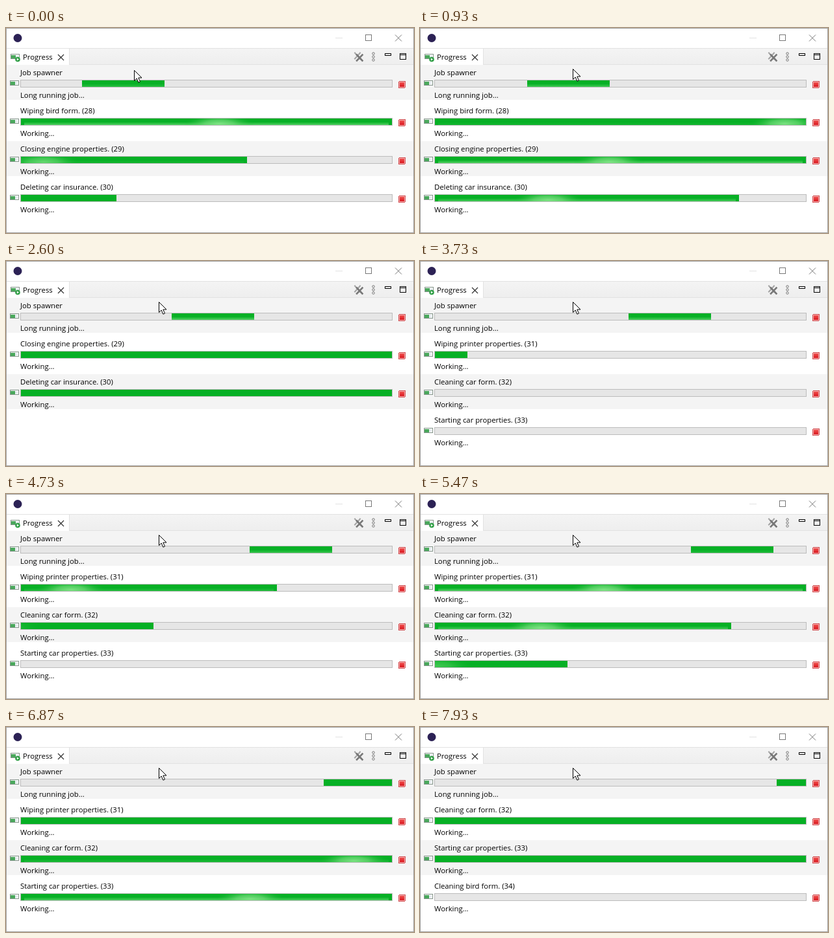
Animation, 628 px wide and 317 px high, one loop 8000 ms. Source, as an HTML page:

```html
<!DOCTYPE html>
<html lang="en">
<head>
<meta charset="utf-8">
<title>Progress</title>
<style>
  html, body { margin: 0; width: 100%; height: 100%; overflow: hidden; background: #fff; }
  svg { display: block; }
  text { font: 11.3px "Open Sans", "Noto Sans", sans-serif; fill: #000; }
  rect, .crisp { shape-rendering: crispEdges; }
  .line { fill: none; }
</style>
</head>
<body>
<svg id="stage" width="628" height="317" viewBox="0 0 628 317">
  <defs>
    <radialGradient id="shine" cx=".5" cy=".5" r=".5">
      <stop offset="0" stop-color="#86e68a" stop-opacity=".9"/>
      <stop offset=".4" stop-color="#78de7e" stop-opacity=".65"/>
      <stop offset=".75" stop-color="#50cc5c" stop-opacity=".2"/>
      <stop offset="1" stop-color="#06b025" stop-opacity="0"/>
    </radialGradient>
    <linearGradient id="glow" x2="0" y2="1">
      <stop offset="0" stop-color="#5fd56c" stop-opacity="0"/>
      <stop offset=".5" stop-color="#66d872" stop-opacity=".4"/>
      <stop offset="1" stop-color="#6cdb78" stop-opacity=".8"/>
    </linearGradient>
    <linearGradient id="tabs" x2="0" y2="1">
      <stop offset="0" stop-color="#f4f4f4"/>
      <stop offset="1" stop-color="#eee"/>
    </linearGradient>
    <linearGradient id="red" x2="0" y2="1">
      <stop offset="0" stop-color="#f0504e"/>
      <stop offset="1" stop-color="#d8141c"/>
    </linearGradient>
    <g id="jobIcon">
      <rect x=".5" y=".5" width="13" height="7" fill="#fafcfa" stroke="#84948b"/>
      <rect x="1" y="2" width="7" height="5" fill="#4aa85c"/>
      <rect x="8" y="2" width="4" height="4" fill="#e6ecf0"/>
    </g>
    <g id="stop">
      <rect x=".5" y=".5" width="10" height="10" rx="1.500" fill="#f7b4b4" stroke="#cf4a4e"/>
      <rect x="2" y="2" width="7" height="7" fill="url(#red)"/>
    </g>
  </defs>

  <rect width="628" height="317" fill="#fff"/>
  <circle cx="18" cy="15.500" r="6.500" fill="#2c2255"/>
  <g class="line">
    <path class="crisp" d="M507 15.500h11" stroke="#e2e2e2"/>
    <rect x="553.500" y="10.500" width="9" height="9" stroke="#777"/>
    <path d="M599 10.500l10 10m0-10l-10 10" stroke="#777"/>
  </g>

  <rect x="1" y="31" width="626" height="26" fill="url(#tabs)"/>
  <rect x="1" y="32" width="96" height="25" fill="#fff"/>
  <path class="line crisp" d="M1 31.500H627M97.500 32V56.500H627" stroke="#e2e2e2"/>
  <use href="#jobIcon" x="7" y="40"/>
  <circle cx="18" cy="48.500" r="3.800" fill="#2f9e45"/>
  <path d="M16.800 46.500v4l3.200-2z" fill="#fff"/>
  <text x="26" y="49">Progress</text>
  <path class="line" d="M80 41l9 9m0-9l-9 9" stroke="#333" stroke-width="1.200"/>
  <g class="line" stroke-linecap="square">
    <path d="M537 38.500l8 9m0-9l-8 9" stroke="#a4a4a4" stroke-width="2"/>
    <path d="M540 41.500l8.500 9m0-9l-8.500 9" stroke="#777" stroke-width="2.600"/>
  </g>
  <g fill="#fff" stroke="#666">
    <circle cx="565.500" cy="39.500" r="1.700"/>
    <circle cx="565.500" cy="44.500" r="1.700"/>
    <circle cx="565.500" cy="49.500" r="1.700"/>
  </g>
  <g class="line" stroke="#000">
    <rect x="583.500" y="39.500" width="9" height="3"/>
    <rect x="606.500" y="39.500" width="9" height="9"/>
    <path class="crisp" d="M606 41.500h10"/>
  </g>

  <g id="rows"></g>
  <g id="scroll">
    <rect x="609" y="57" width="17" height="259" fill="#f0f0f0"/>
    <rect x="609" y="74" width="17" height="200" fill="#cdcdcd"/>
    <path class="line" d="M614 67.500l3.500-3.500 3.500 3.500M614 307.500l3.500 3.500 3.500-3.500" stroke="#505050" stroke-width="1.500"/>
  </g>
  <rect class="line" x=".5" y=".5" width="627" height="316" stroke="#a3a3a3"/>
  <path id="cursor" d="M.500 .500V16.500L4.200 13 6.900 19.200 9.500 18 6.800 12H12z" fill="#fff" stroke="#000"/>
</svg>

<script>
const LOOP = 8000, STEP = 1000 / 15;
const PITCH = 59, TROUGH = 571, CHUNK = 127, SCROLLBAR = 17;
const FILL_SPEED = .344, SHINE_SPEED = .25, SHINE_END = 588;

// add/remove: time in the list; start: filling begins; pass: shine enters the bar
const jobs = [
  { label: "Wiping bird form. (28)", add: -1, remove: 2130, start: -1700, pass: -1220 },
  { label: "Closing engine properties. (29)", add: -1, remove: 2900, start: -1012, pass: -140 },
  { label: "Deleting car insurance. (30)", add: -1, remove: 3660, start: -427, pass: 236 },
  { label: "Wiping printer properties. (31)", add: 2710, remove: 7200, start: 3588, pass: 4427 },
  { label: "Cleaning car form. (32)", add: 3260, remove: LOOP, start: 4141, pass: 4817 },
  { label: "Starting car properties. (33)", add: 3530, remove: LOOP, start: 4874, pass: 5455 },
  { label: "Cleaning bird form. (34)", add: 7700, remove: LOOP, start: 8785, pass: 9500 }
];

const byId = id => document.getElementById(id);
const clamp = (v, lo, hi) => Math.min(hi, Math.max(lo, v));
const set = (el, attrs) => { for (const k in attrs) el.setAttribute(k, attrs[k]); };
const show = (el, on) => set(el, { visibility: on ? "visible" : "hidden" });

function makeRow(index) {
  const g = document.createElementNS("http://www.w3.org/2000/svg", "g");
  set(g, { transform: `translate(0 ${index * PITCH})` });
  g.innerHTML = `
    <rect x="1" y="57" width="626" height="54" fill="${index % 2 ? "#fff" : "#f4f4f4"}"/>
    <use href="#jobIcon" x="6" y="81"/>
    <text class="label" x="22" y="73"></text>
    <rect class="trough" x="22.500" y="80.500" width="572" height="11" fill="#e6e6e6" stroke="#bcbcbc"/>
    <svg class="fill" x="23" y="81" height="10" overflow="hidden">
      <rect width="100%" height="10" fill="#06b025"/>
      <rect class="glow" y="5" height="5" fill="url(#glow)"/>
      <rect class="shine" y="-6" width="110" height="28" fill="url(#shine)"/>
    </svg>
    <use class="stop" href="#stop" x="604" y="82"/>
    <text x="22" y="108">${index ? "Working..." : "Long running job..."}</text>`;
  byId("rows").append(g);
  const row = { g };
  for (const name of ["label", "trough", "fill", "glow", "shine", "stop"])
    row[name] = g.querySelector("." + name);
  return row;
}

const rows = Array.from({ length: 5 }, (_, i) => makeRow(i));

function drawBar(row, label, bar) {
  if (row.label.textContent !== label) row.label.textContent = label;
  set(row.trough, { width: bar.trough + 1 });
  set(row.stop, { x: 604 - (TROUGH - bar.trough) });
  set(row.fill, { x: 23 + bar.x, width: Math.max(0, bar.width) });
  set(row.glow, { x: bar.inset, width: Math.max(0, bar.width - 2 * bar.inset), opacity: Math.max(0, bar.glow) });
  set(row.shine, {
    x: bar.shine - 55,
    opacity: bar.shine < SHINE_END ? clamp(.45 + bar.shine / 100, 0, 1) : 0
  });
}

function draw(t) {
  const listed = jobs.filter(j => t >= j.add && t < j.remove);
  const scrolling = listed.length > 3;
  const trough = TROUGH - (scrolling ? SCROLLBAR : 0);
  show(byId("scroll"), scrolling);

  const x = 94 + 6 * Math.floor(t / 110 + .35);
  drawBar(rows[0], "Job spawner", {
    trough, x, width: Math.min(CHUNK, trough - x), inset: 0, shine: -200,
    glow: x < 440 ? Math.sin(Math.PI * (x - 37) / 400) : 0
  });

  rows.slice(1).forEach((row, i) => {
    const job = listed[i];
    show(row.g, !!job);
    if (!job) return;
    const shine = (t - job.pass) * SHINE_SPEED;
    drawBar(row, job.label, {
      trough, x: 0, shine, inset: 5,
      width: Math.round(clamp((t - job.start) * FILL_SPEED, 0, trough)),
      glow: Math.sin(Math.PI * clamp(shine / TROUGH, 0, 1))
    });
  });

  const p = clamp(t / 600, 0, 1), move = p * p * (3 - 2 * p);
  set(byId("cursor"), { transform: `translate(${Math.round(197 + 38 * move)} ${Math.round(65 - 2 * move)})` });
}

const origin = performance.now();
function tick() {
  const t = (performance.now() - origin) % LOOP;
  draw(Math.floor((t + 4) / STEP) * STEP % LOOP);
  requestAnimationFrame(tick);
}
tick();
</script>
</body>
</html>
```
